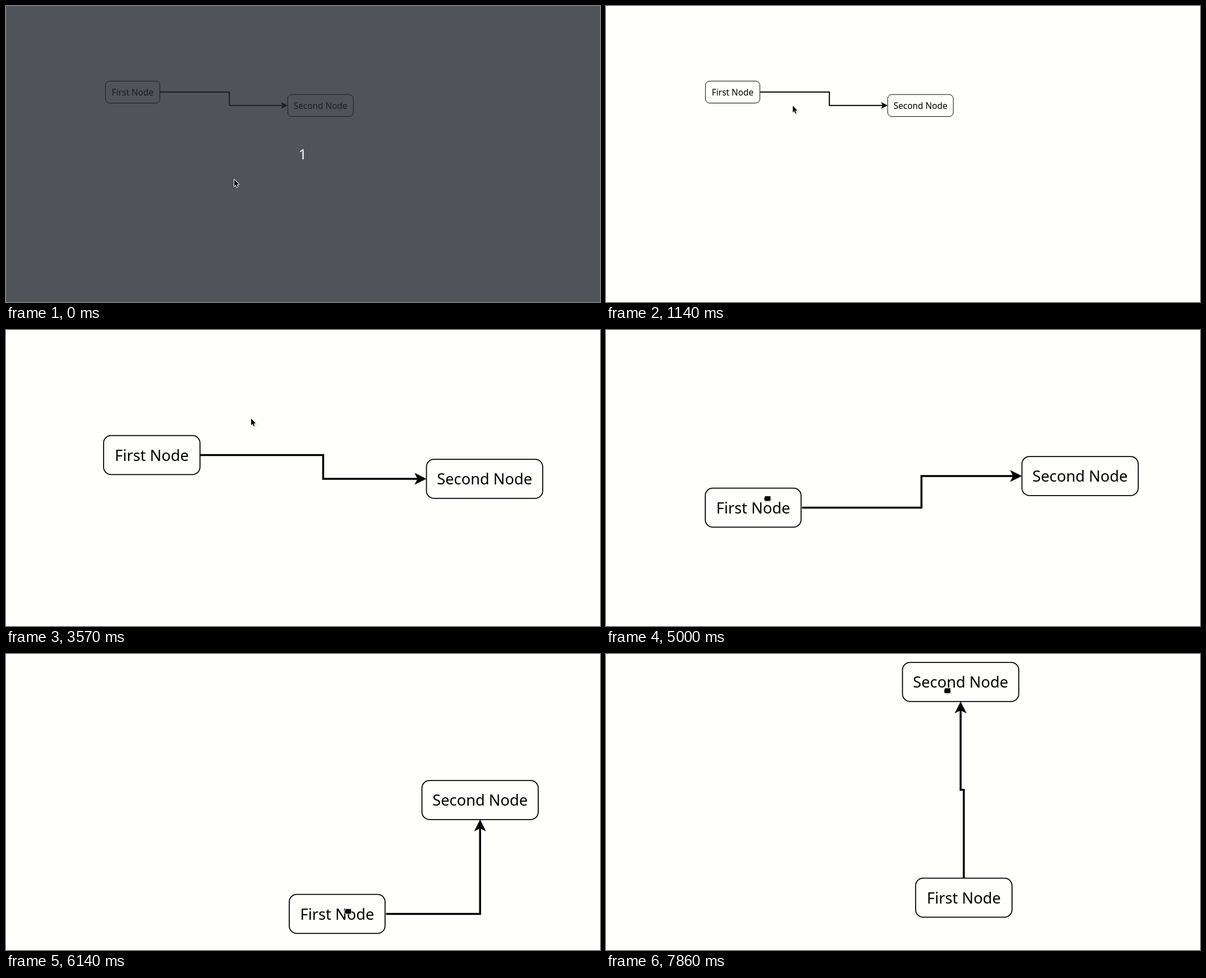
An HTML page with a canvas that plays this animation: 1059 px wide and 529 px high, repeating every 8000 ms.

```html
<!DOCTYPE html>
<html lang="en">
<head>
<meta charset="utf-8">
<title>Node graph</title>
<style>
  html, body { margin: 0; width: 100%; height: 100%; overflow: hidden; background: #fffffc; }
  canvas { display: block; }
</style>
</head>
<body>
<canvas id="stage" width="1059" height="529"></canvas>
<script>
const W = 1059, H = 529, LOOP = 8000, TICKS = 7; // ticks per second
const ctx = document.getElementById('stage').getContext('2d');
const FONT = '"Noto Sans", "Open Sans", sans-serif';

const ramp = (k, from, to) => Math.min(1, Math.max(0, (k - from) / (to - from)));

// Moves a point through hops of [start tick, end tick, x, y], resting in between.
function walk(k, x, y, ...hops) {
  for (const [from, to, tx, ty] of hops) {
    const u = ramp(k, from, to);
    x += (tx - x) * u;
    y += (ty - y) * u;
  }
  return [x, y];
}

const zoom = k => 1.1 ** Math.round(4 * ramp(k, 11, 14) + 2 * ramp(k, 15, 17));
const pan = k => walk(k, 0, 0, [22, 25, 96, 60], [26, 27, 88, 55]);
const dragFirst = k => walk(k, 0, 0,
  [32, 35, 11, 99], [35, 40, 267, 263], [40, 43, 339, 246], [43, 44, 386, 217]);
const dragSecond = k => walk(k, 0, 0, [47, 53, -229, -215], [53, 55, -213, -211]);
const holdsFirst = k => k >= 33 && k <= 44;
const holdsSecond = k => k >= 48;

// The pointer adds its own hops to the drags, trailing them slightly.
function pointerAt(k) {
  const [x, y] = walk(k, 406, 309, [4, 8, 332, 177], [9, 10, 312, 169], [11, 12, 305, 161],
    [19, 21, 331, 107], [22, 25, 436, 157], [26, 31, 278, 212], [44, 46, 438, 60]);
  const [ax, ay] = dragFirst(k - 0.3);
  const [bx, by] = dragSecond(k - 0.3);
  return [x + ax + bx, y + ay + by];
}

function poly(points, close) {
  ctx.beginPath();
  points.forEach(([x, y]) => ctx.lineTo(x, y));
  if (close) ctx.closePath();
}

function makeNode(label, x, y, w, [dx, dy], s) {
  const h = 39.3;
  x += dx / s;
  y += dy / s;
  return { label, x, y, w, h, right: x + w, bottom: y + h, cx: x + w / 2, cy: y + h / 2 };
}

function drawNode(n) {
  ctx.lineWidth = 1;
  ctx.beginPath();
  ctx.roundRect(n.x, n.y, n.w, n.h, 7.5);
  ctx.stroke();
  ctx.font = '15.4px ' + FONT;
  ctx.textAlign = 'center';
  ctx.fillText(n.label, n.cx, n.y + 25.4);
}

// Manhattan routing: straight across, one bend, or up through the middle.
function route(a, b, gap) {
  const start = [a.right + gap, a.cy];
  if (a.cy - b.bottom <= 20) {
    const mid = (a.right + b.x) / 2 + 10;
    return [start, [mid, a.cy], [mid, b.cy], [b.x, b.cy]];
  }
  if (b.cx - a.right > 10) return [start, [b.cx, a.cy], [b.cx, b.bottom]];
  const mid = (a.y + b.bottom) / 2;
  return [[a.cx, a.y], [a.cx, mid], [b.cx, mid], [b.cx, b.bottom]];
}

function drawEdge(points) {
  const [[px, py], [x, y]] = points.slice(-2);
  const angle = Math.atan2(y - py, x - px);
  const end = [x - 5 * Math.cos(angle), y - 5 * Math.sin(angle)];
  ctx.lineWidth = 2;
  poly([...points.slice(0, -1), end]);
  ctx.stroke();
  ctx.save();
  ctx.translate(x, y);
  ctx.rotate(angle);
  poly([[0, 0], [-12, -6], [-9, 0], [-12, 6]], true);
  ctx.fill();
  ctx.restore();
}

function arrowShape() {
  poly([[1, 1.2], [1, 13.2], [3.6, 10.8], [5.6, 15], [7.4, 14.2], [5.5, 10], [9.2, 9.8]], true);
}

function fistShape() {
  ctx.beginPath();
  ctx.roundRect(-5.5, -3, 11, 7.5, 2.5);
  for (let i = 0; i < 4; i++) {
    const x = -3.3 + i * 2.5;
    ctx.moveTo(x + 1.3, -3);
    ctx.arc(x, -3, 1.3, 0, 2 * Math.PI);
  }
}

function drawPointer(k) {
  const shape = holdsFirst(k) || holdsSecond(k) ? fistShape : arrowShape;
  ctx.save();
  ctx.lineJoin = 'round';
  ctx.translate(...pointerAt(k));
  ctx.translate(1, 1.2);
  ctx.strokeStyle = 'rgba(0,0,0,.22)';
  ctx.lineWidth = 1.6;
  shape();
  ctx.stroke();
  ctx.translate(-1, -1.2);
  ctx.strokeStyle = '#fff';
  ctx.fillStyle = '#000';
  ctx.lineWidth = 2;
  shape();
  ctx.stroke();
  ctx.fill();
  ctx.restore();
}

function drawCountdown() {
  ctx.fillStyle = 'rgba(34,38,48,.79)';
  ctx.fillRect(0, 0, W, H);
  ctx.fillStyle = '#fff';
  ctx.font = '25px ' + FONT;
  ctx.textAlign = 'center';
  ctx.fillText('1', 529, 274);
}

function draw(k) {
  const s = zoom(k);
  const [panX, panY] = pan(k);
  const held = holdsFirst(k);
  const first = makeNode('First Node', 177.3, 134.2, held ? 96.4 : 97, dragFirst(k), s);
  const second = makeNode('Second Node', 502.2, 158.2, 117, dragSecond(k), s);

  ctx.fillStyle = '#fffffc';
  ctx.fillRect(0, 0, W, H);
  ctx.save();
  ctx.translate(306 + panX, 141.4 + panY);
  ctx.scale(s, s);
  ctx.translate(-306, -141.4);
  ctx.strokeStyle = ctx.fillStyle = '#000';
  drawEdge(route(first, second, held ? 1 : 0));
  drawNode(first);
  drawNode(second);
  ctx.restore();
  if (k < 1) drawCountdown();
  drawPointer(k);
}

const start = performance.now();
function frame() {
  const t = (performance.now() - start) % LOOP;
  draw(Math.min(55, Math.floor(t * TICKS / 1000 + 0.03)));
  requestAnimationFrame(frame);
}
frame();
</script>
</body>
</html>
```
